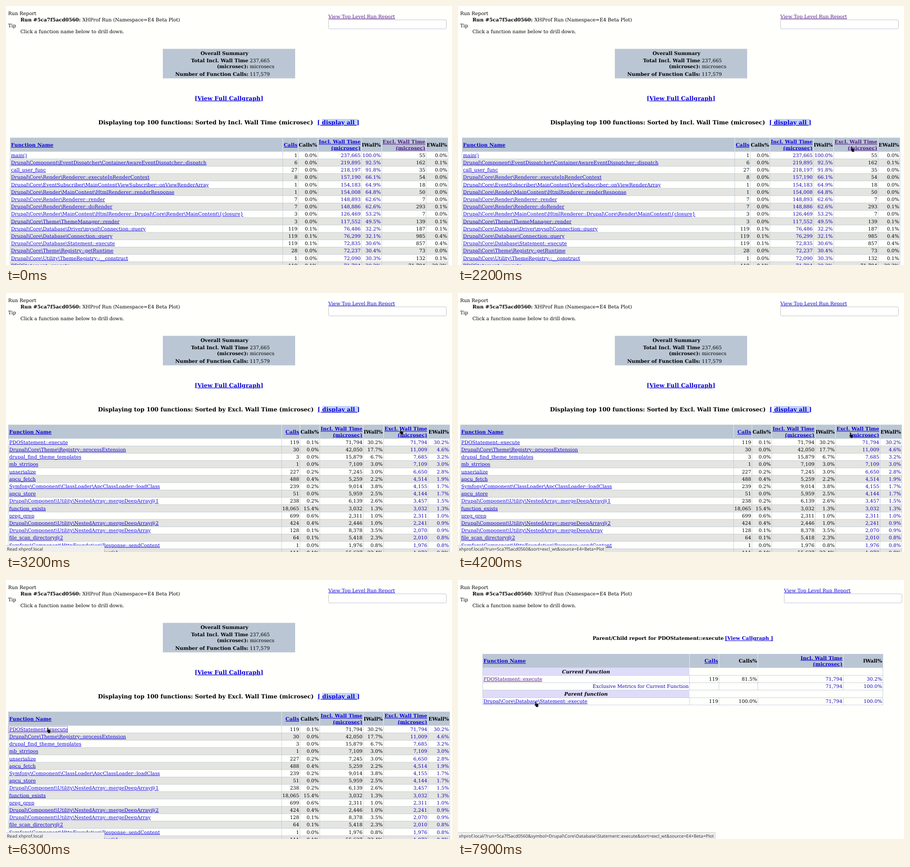
These frames come from a looping animation (981x571 px, 8 s). An HTML page:

```html
<!DOCTYPE html>
<html lang="en">
<head>
<meta charset="utf-8">
<title>Profiler run report</title>
<style>
html, body { margin: 0; width: 100%; height: 100%; overflow: hidden; background: #fffffc; }
svg { display: block; width: 981px; height: 571px; }
text { font: 10.62px "DejaVu Serif", serif; fill: #000; white-space: pre; text-rendering: geometricPrecision; }
.b { font-weight: bold; font-size: 10.85px; }
.h { font-weight: bold; font-size: 12.63px; }
.i { font-style: italic; }
.l { fill: #0a00d8; text-decoration: underline; }
.v { fill: #551a8b; text-decoration: underline; }
.n { fill: #1500b4; }
.s { font: 9.75px "Noto Sans", sans-serif; fill: #3a3a3a; }
.dots { fill: none; stroke: #551a8b; stroke-dasharray: 1 1; }
</style>
</head>
<body>
<svg id="stage" viewBox="0 0 981 571"></svg>
<script>
const NS = 'http://www.w3.org/2000/svg';
const stage = document.getElementById('stage');
const HEAD = '#bac6d3', STRIPE = '#e4e4e1', LAVENDER = '#dedcf9';

function add(parent, tag, attrs = {}) {
  const el = document.createElementNS(NS, tag);
  for (const k in attrs) el.setAttribute(k, attrs[k]);
  return parent.appendChild(el);
}
function text(g, x, y, str, cls = '', anchor = 'start') {
  const el = add(g, 'text', { x, y, class: cls, 'text-anchor': anchor });
  el.textContent = str;
  return el;
}
const rect = (g, x, y, x2, y2, fill) => add(g, 'rect', { x, y, width: x2 - x, height: y2 - y, fill });
const hline = (g, x, x2, y, c = HEAD) => rect(g, x, y - .4, x2, y + .4, c);
const vline = (g, x, y, y2, c = HEAD) => rect(g, x - .4, y, x + .4, y2, c);

const SITE = 'E4 Beta Plot';

function topBar(g, x, linkCls) {
  text(g, 4.8, 20.2, 'Run Report');
  text(g, 31.7, 33.6, 'Run #5ca7f5acd0560:', 'b').style.fontSize = '10.74px';
  text(g, 168, 33.6, `XHProf Run (Namespace=${SITE})`);
  text(g, 4.8, 46.6, 'Tip');
  text(g, 31.7, 59.5, 'Click a function name below to drill down.');
  text(g, x, 26.8, 'View Top Level Run Report', linkCls);
  add(g, 'rect', { x: x + .5, y: 30.5, width: 259, height: 20, rx: 2.5, fill: '#fff', stroke: '#c3c3cc' });
}

function summary(g) {
  rect(g, 345, 94.5, 636, 159.5, HEAD);
  [['Overall Summary', 107.5], ['Total Incl. Wall Time', 124.1], ['(microsec):', 137.4], ['Number of Function Calls:', 154.4]]
    .forEach(([s, y]) => text(g, 533, y, s, 'b', 'end'));
  [['237,665', 124.1], ['microsecs', 137.4], ['117,579', 154.4]].forEach(([s, y]) => text(g, 536.3, y, s));
}

// edges: table left, column borders, table right
function listPage(o) {
  const g = add(stage, 'g');
  const e = o.edges, left = e[0], right = e[7];
  const end = i => e[i + 1] - 1.8;
  topBar(g, 709, o.topCls);
  summary(g);
  text(g, 490.5, 207.8, '[View Full Callgraph]', 'h l', 'middle');
  rect(g, o.linkX + 10.5, 249, o.linkX + 88, 264.5, '#c3d5f7');
  text(g, o.titleX, 261.2, `Displaying top 100 functions: Sorted by ${o.sort} Wall Time (microsec)`, 'h');
  text(g, o.linkX, 261.2, '[ display all ]', 'h l');

  rect(g, left, 290.3, right, 320.7, HEAD);
  text(g, left + 2, 310, 'Function Name', 'b l');
  text(g, end(1), 310, 'Calls', 'b l', 'end');
  text(g, end(2), 310, 'Calls%', 'b', 'end');
  text(g, end(4), 310, 'IWall%', 'b', 'end');
  text(g, end(6), 310, 'EWall%', 'b', 'end');
  [[3, 'Incl.', 'l'], [5, 'Excl.', o.exclCls]].forEach(([i, s, c]) => {
    text(g, end(i), 303.3, s + ' Wall Time', 'b ' + c, 'end');
    text(g, end(i), 316.5, '(microsec)', 'b ' + c, 'end');
  });

  o.rows.trim().split('\n').forEach((line, r) => {
    const y = 320.9 + 16.2 * r, cells = line.trim().split(' ');
    if (r % 2) rect(g, left, y, right, y + 16.2, STRIPE);
    hline(g, left, right, y);
    text(g, left + 2, y + 11.9, cells[0], 'l');
    for (let i = 1; i < 7; i++)
      text(g, end(i), y + 11.9, cells[i], o.blue.includes(i) ? 'n' : '', 'end');
  });
  e.forEach((x, i) => {
    vline(g, x, 320.7, 571);
    if (i % 7) vline(g, x, 290.3, 320.7, '#f4f6f8');
  });
  return g;
}

const inclPage = listPage({
  edges: [9, 608.8, 642.8, 686, 781.8, 826.2, 924, 972.2],
  topCls: 'v', exclCls: 'v', sort: 'Incl.', titleX: 203, linkX: 684.5, blue: [3, 4],
  rows: String.raw`
main() 1 0.0% 237,665 100.0% 55 0.0%
Drupal\Component\EventDispatcher\ContainerAwareEventDispatcher::dispatch 6 0.0% 219,895 92.5% 162 0.1%
call_user_func 27 0.0% 218,197 91.8% 35 0.0%
Drupal\Core\Render\Renderer::executeInRenderContext 8 0.0% 157,190 66.1% 54 0.0%
Drupal\Core\EventSubscriber\MainContentViewSubscriber::onViewRenderArray 1 0.0% 154,183 64.9% 18 0.0%
Drupal\Core\Render\MainContent\HtmlRenderer::renderResponse 1 0.0% 154,008 64.8% 50 0.0%
Drupal\Core\Render\Renderer::render 7 0.0% 148,893 62.6% 7 0.0%
Drupal\Core\Render\Renderer::doRender 7 0.0% 148,886 62.6% 293 0.1%
Drupal\Core\Render\MainContent\HtmlRenderer::Drupal\Core\Render\MainContent\{closure} 3 0.0% 126,469 53.2% 7 0.0%
Drupal\Core\Theme\ThemeManager::render 3 0.0% 117,552 49.5% 139 0.1%
Drupal\Core\Database\Driver\mysql\Connection::query 119 0.1% 76,486 32.2% 187 0.1%
Drupal\Core\Database\Connection::query 119 0.1% 76,299 32.1% 985 0.4%
Drupal\Core\Database\Statement::execute 119 0.1% 72,835 30.6% 857 0.4%
Drupal\Core\Theme\Registry::getRuntime 28 0.0% 72,237 30.4% 73 0.0%
Drupal\Core\Utility\ThemeRegistry::__construct 1 0.0% 72,090 30.3% 132 0.1%
PDOStatement::execute 119 0.1% 71,794 30.2% 71,794 30.2%`
});

const exclPage = listPage({
  edges: [5, 606.2, 646.6, 690, 785.8, 830.4, 928.2, 976.2],
  topCls: 'l', exclCls: 'l', sort: 'Excl.', titleX: 202.3, linkX: 685.2, blue: [5, 6],
  rows: String.raw`
PDOStatement::execute 119 0.1% 71,794 30.2% 71,794 30.2%
Drupal\Core\Theme\Registry::processExtension 30 0.0% 42,050 17.7% 11,009 4.6%
drupal_find_theme_templates 3 0.0% 15,879 6.7% 7,685 3.2%
mb_strripos 1 0.0% 7,109 3.0% 7,109 3.0%
unserialize 227 0.2% 7,245 3.0% 6,650 2.8%
apcu_fetch 488 0.4% 5,259 2.2% 4,514 1.9%
Symfony\Component\ClassLoader\ApcClassLoader::loadClass 239 0.2% 9,014 3.8% 4,155 1.7%
apcu_store 51 0.0% 5,959 2.5% 4,144 1.7%
Drupal\Component\Utility\NestedArray::mergeDeepArray@1 238 0.2% 6,139 2.6% 3,457 1.5%
function_exists 18,065 15.4% 3,032 1.3% 3,032 1.3%
preg_grep 699 0.6% 2,311 1.0% 2,311 1.0%
Drupal\Component\Utility\NestedArray::mergeDeepArray@2 424 0.4% 2,446 1.0% 2,241 0.9%
Drupal\Component\Utility\NestedArray::mergeDeepArray 128 0.1% 8,378 3.5% 2,070 0.9%
file_scan_directory@2 64 0.1% 5,418 2.3% 2,010 0.8%
Symfony\Component\HttpFoundation\Response::sendContent 1 0.0% 1,976 0.8% 1,976 0.8%
Drupal\Core\Render\Renderer::doRender@1 111 0.1% 55,637 23.4% 1,972 0.8%`
});

function detailPage() {
  const g = add(stage, 'g'), L = 54.4, R = 934.6;
  const cols = [509.2, 574, 659.6, 847.4, R], end = i => cols[i] - 1.8;
  topBar(g, 717, 'l');
  text(g, 296, 132.3, 'Parent/Child report for PDOStatement::execute', 'b');
  text(g, 587, 132.3, '[View Callgraph ]', 'b l');

  rect(g, 54, 163, 935, 193.6, HEAD);
  text(g, 56, 182.3, 'Function Name', 'b l');
  text(g, end(1), 182.3, 'Calls', 'b l', 'end');
  text(g, end(2), 182.3, 'Calls%', 'b', 'end');
  text(g, end(3), 175.6, 'Incl. Wall Time', 'b l', 'end');
  text(g, end(3), 188.8, '(microsec)', 'b l', 'end');
  text(g, end(4), 182.3, 'IWall%', 'b', 'end');
  cols.slice(0, 4).forEach(x => vline(g, x, 163, 193.6, '#f4f6f8'));

  [['Current Function', 193.6, 210.2], ['Parent function', 242.8, 259.4]].forEach(([s, y, y2]) => {
    rect(g, L, y, 509, y2, LAVENDER);
    text(g, 281.6, y + 12.2, s, 'b i', 'middle');
  });
  const row = (y, c) => {
    c.forEach((s, i) => text(g, end(i + 1), y + 11.9, s, i > 1 ? 'n' : '', 'end'));
    cols.forEach(x => vline(g, x, y, y + 16.2));
  };
  text(g, 56, 222.1, 'PDOStatement::execute', 'v');
  row(210.2, ['119', '81.5%', '71,794', '30.2%']);
  text(g, end(0), 238.3, 'Exclusive Metrics for Current Function', 'n', 'end');
  row(226.4, ['', '', '71,794', '100.0%']);
  text(g, 56, 271.3, 'Drupal\\Core\\Database\\Statement::execute', 'l');
  row(259.4, ['119', '100.0%', '71,794', '100.0%']);
  [210.2, 226.4, 242.8, 259.4, 275.5].forEach(y => hline(g, 54, 935, y));
  vline(g, L, 193.6, 275.5);
  vline(g, R, 193.6, 275.5);
  return g;
}
const pages = [inclPage, exclPage, detailPage()];

// Focus rings of clicked links
const rings = [
  'M827.5 292.5H922.5V319.5H856.5V306.5H827.5Z M856.5 306.5H922.5',
  'M5.5 322.5H135.5V336.5H5.5Z'
].map(d => add(stage, 'path', { d, class: 'dots' }));

// Status bar messages
const run = 'xhprof.local/?run=5ca7f5acd0560&';
const tail = 'sort=excl_wt&source=' + SITE.replace(/ /g, '+');
const bars = [
  run + tail,
  'Waiting for xhprof.local…',
  'Read xhprof.local',
  run + 'symbol=PDOStatement::execute&' + tail,
  run + 'symbol=Drupal\\Core\\Database\\Statement::execute&' + tail
].map(s => {
  const g = add(stage, 'g');
  const box = add(g, 'rect', { x: -.5, y: 556.5, height: 16, fill: '#efefed', stroke: '#c9c9c7' });
  const len = text(g, 2, 567.8, s, 's').getComputedTextLength();
  box.setAttribute('width', Math.max(217, len + 5.5));
  return g;
});

const cursors = [
  'M0 0V10.8L2.5 8.5 4.2 12.2 6 11.4 4.4 7.8H7.6Z',
  'M2 1.3C2 0 4 0 4 1.3V4.8L7.5 5.5Q9 6 9 7.5L8.4 10V12.5H3.4V11L.6 8Q0 6.9 1 6.5L2 7.1Z'
].map(d => add(stage, 'path', { d, fill: '#151515', stroke: '#fff', 'stroke-width': .8, 'paint-order': 'stroke' }));

// [start ms, index]; -1 shows nothing
const pageSteps = [[0, 0], [3200, 1], [6500, 2]];
const ringSteps = [[0, -1], [2800, 0], [3200, -1], [6100, 1], [6500, -1]];
const barSteps = [[0, -1], [2300, 0], [2900, 1], [3000, 2], [3400, 0], [4300, -1],
  [5800, 3], [6200, 1], [6300, 2], [6500, -1], [7900, 4]];

// [ms, x, y, cursor kind]
const ARROW = 0, HAND = 1;
const path = [
  [1000, 150, 284, ARROW], [1300, 527, 355, ARROW], [1400, 527, 355, ARROW],
  [1500, 648, 361, ARROW], [1800, 768, 346, ARROW], [2100, 848, 319, ARROW],
  [2200, 863, 309, HAND], [2300, 866, 304, HAND], [2400, 862, 302, HAND], [2500, 865, 300, HAND],
  [4100, 865, 300, HAND], [4200, 860, 307, HAND], [4300, 806, 309, ARROW],
  [4700, 380, 318, ARROW], [5000, 194, 323, ARROW], [5300, 134, 323, HAND],
  [5400, 118, 323, HAND], [5500, 118, 323, HAND], [5600, 93, 325, HAND], [5900, 89, 325, HAND],
  [6400, 89, 325, HAND], [6500, 91.5, 325.5, ARROW], [7100, 91.5, 325.5, ARROW],
  [7200, 98, 323, ARROW], [7300, 105, 322, ARROW], [7400, 105, 322, ARROW],
  [7500, 140, 303, ARROW], [7600, 140, 303, ARROW], [7700, 157, 281, ARROW],
  [7800, 168, 262, HAND], [7900, 168, 267.5, HAND]
];

function show(list, on) {
  list.forEach((el, i) => { el.style.display = i === on ? '' : 'none'; });
}
const last = (steps, t) => steps.reduce((i, s, n) => s[0] <= t ? n : i, -1);
const pick = (steps, t) => steps[last(steps, t)][1];

function draw(t) {
  show(pages, pick(pageSteps, t));
  show(rings, pick(ringSteps, t));
  show(bars, pick(barSteps, t));
  const i = last(path, t);
  if (i < 0) return show(cursors, -1);
  const a = path[i], b = path[i + 1] || a;
  const k = b === a ? 0 : (t - a[0]) / (b[0] - a[0]);
  const x = a[1] + (b[1] - a[1]) * k, y = a[2] + (b[2] - a[2]) * k;
  show(cursors, a[3]);
  cursors[a[3]].setAttribute('transform', `translate(${x} ${y})`);
}

// The screen is sampled every 100 ms
const start = performance.now();
let shown = -1;
function tick() {
  const t = Math.floor((performance.now() - start) % 8000 / 100) * 100;
  if (t !== shown) draw(shown = t);
  requestAnimationFrame(tick);
}
tick();
</script>
</body>
</html>
```
